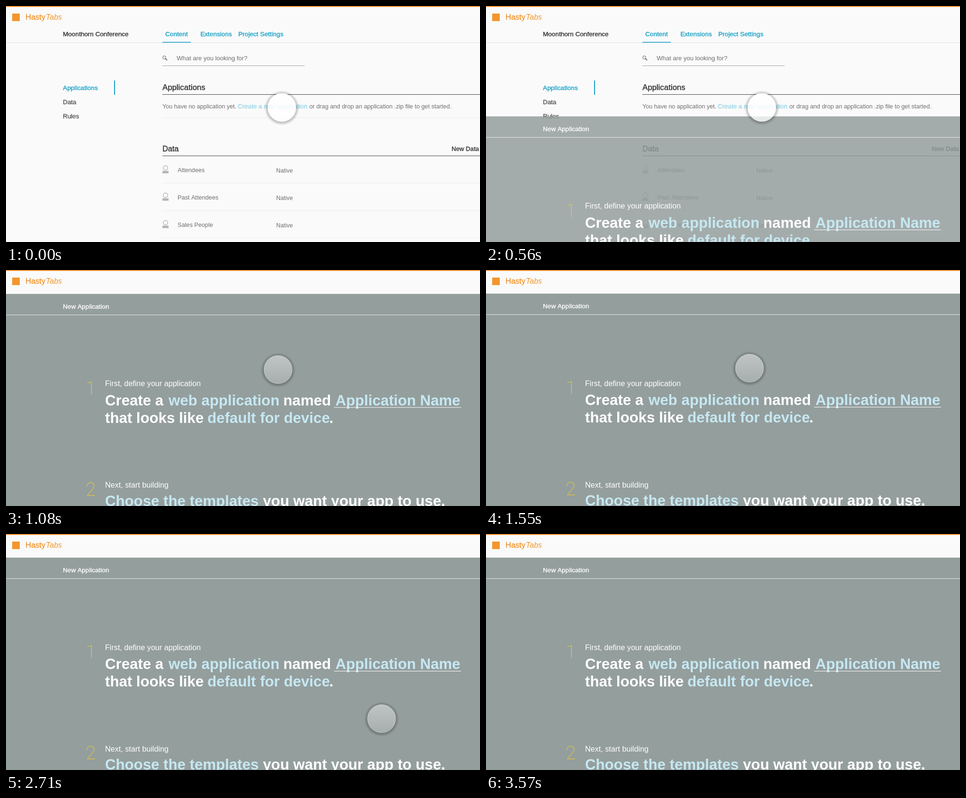
These frames come from a looping animation (1000 px wide and 500 px high, 3.64 s). An HTML page with a canvas:

```html
<!DOCTYPE html>
<html lang="en">
<head>
<meta charset="utf-8">
<title>New application</title>
<style>
html, body { margin: 0; width: 100%; height: 100%; overflow: hidden; background: #fafafa; }
canvas { display: block; }
</style>
</head>
<body>
<canvas id="stage" width="1000" height="500"></canvas>
<script>
const ctx = document.getElementById('stage').getContext('2d');
const LOOP = 3640;
const SANS = '"Liberation Sans", Arial, sans-serif';
const ORANGE = '#f2962f', BLUE = '#159fc6', DARK = '#2e2e2e', GREY = '#6e6e6e';
const PALE = '#c6e8f2', WHITE = '#fff', YELLOW = '#efcd2c';

// The sliding panel is refreshed only at these moments.
const SLIDE_STEPS = [510, 560, 620, 670, 730, 820, 880, 940, 1000, 1080, 1170, 1250, 1430];

// Pointer path: time, x, y
const PATH = [
  [1000, 582, 215], [1080, 574, 211], [1430, 574, 211], [1550, 556, 208],
  [1960, 556, 208], [2130, 525, 197], [2210, 525, 197], [2470, 717, 300],
  [2710, 792, 391], [3030, 935, 478], [3570, 1037, 545], [3640, 1050, 555]
];

function text(str, x, y, size, color, style = '') {
  ctx.font = `${style} ${size}px ${SANS}`;
  ctx.fillStyle = color;
  ctx.fillText(str, x, y);
}

// Medium weight: regular letters with a hairline outline
function medium(str, x, y, size, color) {
  text(str, x, y, size, color);
  ctx.strokeStyle = color;
  ctx.lineWidth = 0.35;
  ctx.strokeText(str, x, y);
}

function rect(x, y, w, h, color) {
  ctx.fillStyle = color;
  ctx.fillRect(x, y, w, h);
}

function disc(x, y, r, fill) {
  ctx.beginPath();
  ctx.arc(x, y, r, 0, 7);
  ctx.fillStyle = fill;
  ctx.fill();
}

function ring(x, y, r, color, width) {
  ctx.beginPath();
  ctx.arc(x, y, r, 0, 7);
  ctx.strokeStyle = color;
  ctx.lineWidth = width;
  ctx.stroke();
}

function drawPage() {
  rect(0, 0, 1000, 500, '#fafafa');
  medium('Moonthorn Conference', 120, 64, 13.55, DARK);
  medium('Content', 336, 64, 13.6, BLUE);
  medium('Extensions', 410, 64, 13.6, BLUE);
  medium('Project Settings', 490, 64, 13.6, BLUE);
  rect(0, 77, 1000, 1, '#e2e2e2');
  rect(330, 76, 60, 1.5, BLUE);

  ring(334, 109, 3.2, GREY, 1.1);
  ctx.beginPath();
  ctx.moveTo(336.4, 111.5);
  ctx.lineTo(340, 115);
  ctx.lineWidth = 1.8;
  ctx.stroke();
  text('What are you looking for?', 360, 115, 13.1, GREY);
  rect(330, 126, 300, 1, '#a5a5a5');

  medium('Applications', 120, 178, 13.7, BLUE);
  medium('Data', 120, 208, 13.4, '#555');
  medium('Rules', 120, 238, 13.4, '#555');
  rect(228, 158, 2, 30, BLUE);

  medium('Applications', 330, 178, 16.8, DARK);
  rect(330, 187, 670, 1, '#444');
  text('You have no application yet.', 330, 217, 12.5, GREY);
  medium('Create a new application', 489, 217, 13.35, '#93d5e6');
  text('or drag and drop an application .zip file to get started.', 640, 217, 12.7, GREY);
  rect(330, 236, 670, 1, '#eee');

  medium('Data', 330, 308, 16.3, DARK);
  medium('New Data', 940, 307, 13.2, DARK);
  rect(330, 317, 670, 1, '#444');
  ['Attendees', 'Past Attendees', 'Sales People'].forEach((name, i) => {
    const y = 352 + 58 * i;
    ring(336.5, y - 9, 4.8, '#aaa', 1.2);
    rect(330, y - 2.5, 13, 5, '#b4b4b4');
    text(name, 362, y, 12.7, GREY);
    text('Native', 570, y + 1, 12.4, GREY);
    rect(330, y + 23, 670, 1, '#eee');
  });
}

function drawBrand() {
  rect(0, 0, 1000, 2, ORANGE);
  rect(13, 16, 16, 16, ORANGE);
  medium('Hasty', 41, 29, 16.5, ORANGE);
  text('Tabs', 84, 29, 16, ORANGE, 'italic');
}

function numeral(digit, y) {
  ctx.font = '100 39px Roboto, Lato, sans-serif';
  ctx.fillStyle = YELLOW;
  ctx.textAlign = 'center';
  ctx.fillText(digit, 179, y);
  ctx.textAlign = 'left';
}

function drawPanel(offset) {
  const head = (str, x, y, color) => text(str, x, y, 31.2, color, 'bold');
  ctx.save();
  ctx.translate(0, 50 + offset);
  ctx.globalAlpha = 1 - Math.min(0.4, offset / 1150);
  rect(0, 0, 1000, 500, '#949e9d');
  ctx.globalAlpha = 1;
  medium('New Application', 120, 31, 13.6, WHITE);
  rect(0, 44, 1000, 1, '#e9ecec');

  numeral('1', 213);
  text('First, define your application', 209, 195.5, 16.15, WHITE);
  head('Create a', 209, 236, WHITE);
  head('web application', 343, 236, PALE);
  head('named', 585, 236, WHITE);
  head('Application Name', 695, 236, PALE);
  rect(692, 240, 268, 1, WHITE);
  head('that looks like', 209, 273, WHITE);
  head('default for device', 425, 273, PALE);
  head('.', 682, 273, WHITE);

  numeral('2', 427);
  text('Next, start building', 209, 410.5, 16.2, WHITE);
  head('Choose the templates', 209, 449, PALE);
  head('you want your app to use.', 542, 449, WHITE);
  ctx.restore();
}

// Monotone cubic through the path points
function pathAt(t, axis) {
  if (t <= PATH[0][0]) return PATH[0][axis];
  const slope = i => PATH[i + 1]
    ? (PATH[i + 1][axis] - PATH[i][axis]) / (PATH[i + 1][0] - PATH[i][0]) : 0;
  const tangent = i => {
    const a = i ? slope(i - 1) : 0, b = slope(i);
    return a * b > 0 ? 2 * a * b / (a + b) : 0;
  };
  const i = PATH.findIndex((p, k) => k === PATH.length - 2 || t < PATH[k + 1][0]);
  const span = PATH[i + 1][0] - PATH[i][0];
  const u = (t - PATH[i][0]) / span, v = 1 - u;
  return PATH[i][axis] * v * v * (1 + 2 * u) + PATH[i + 1][axis] * u * u * (3 - 2 * u)
    + span * u * v * (tangent(i) * v - tangent(i + 1) * u);
}

function drawPointer(x, y, haze) {
  const shadow = ctx.createRadialGradient(x, y + 1, 30, x, y + 1, 37);
  shadow.addColorStop(0, 'rgba(0,0,0,.24)');
  shadow.addColorStop(1, 'rgba(0,0,0,0)');
  ctx.beginPath();
  ctx.arc(x, y, 38, 0, 2 * Math.PI);
  ctx.arc(x, y, 30, 0, 2 * Math.PI, true);
  ctx.fillStyle = shadow;
  ctx.fill();

  const glass = ctx.createLinearGradient(0, y - 30, 0, y + 30);
  glass.addColorStop(0, `rgba(255,255,255,${0.4 + haze})`);
  glass.addColorStop(1, `rgba(255,255,255,${0.17 + haze})`);
  disc(x, y, 30, glass);
  ring(x, y, 29.6, 'rgba(255,255,255,.4)', 0.8);
}

function draw(now) {
  const t = now % LOOP;
  const step = SLIDE_STEPS.filter(s => s <= t).pop();
  let offset = 450;
  if (step) offset = step < 1430 ? 450 * Math.exp((490 - step) / 78) + 0.4 : 0;
  drawPage();
  if (step) drawPanel(offset);
  drawBrand();
  drawPointer(pathAt(t, 1), pathAt(t, 2), Math.min(0.55, offset / 300));
  requestAnimationFrame(draw);
}

const start = performance.now();
requestAnimationFrame(function first() { draw(0); });
function draw0() {}
</script>
</body>
</html>
```
